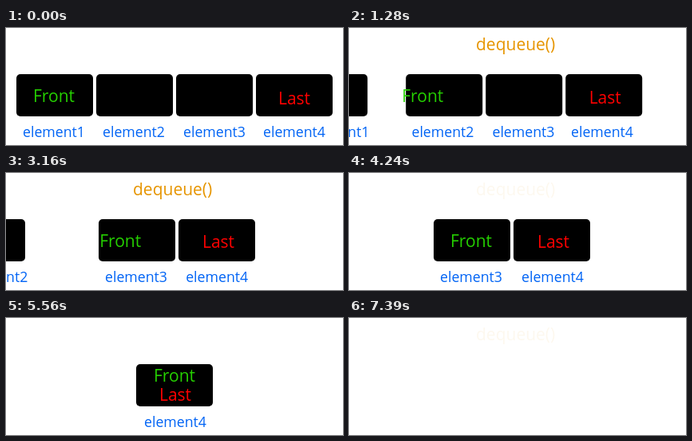
An HTML page with a canvas for the animation above (7420 ms loop, 422 px wide and 147 px high).

```html
<!DOCTYPE html>
<html lang="en">
<head>
<meta charset="utf-8">
<title>Queue dequeue</title>
<style>
html, body { margin: 0; width: 100%; height: 100%; overflow: hidden; background: #fff; }
canvas { display: block; }
</style>
</head>
<body>
<canvas id="stage" width="422" height="147"></canvas>
<script>
const ctx = document.getElementById('stage').getContext('2d');
const LOOP = 7420, STEP = 30, STEPS = 15;

// Resting layouts, before the first and after each dequeue; front and last are [x, baseline].
const poses = [
  { boxes: [13, 113, 213, 313], labels: [21, 121, 222, 322], front: [34, 93], last: [341, 96] },
  { boxes: [-104, 56, 156, 256], labels: [-79, 63, 164, 262], front: [78, 93], last: [286, 94] },
  { boxes: [-104, -104, 106, 206], labels: [-79, -79, 114, 216], front: [127, 93], last: [236, 94] },
  { boxes: [-104, -104, -104, 163], labels: [-79, -79, -79, 173], front: [185, 80], last: [192, 104] },
  { boxes: [-104, -104, -104, -182], labels: [-79, -79, -79, -162], front: [-135, 80], last: [-128, 104] }
];

// Start times of each round: caption fades in, queue moves, caption fades out.
const rounds = [
  [30, 980, 1430],
  [2380, 2830, 3280],
  [4240, 4690, 5140],
  [6130, 6580, 7000]
];

function progress(t, start) {
  const step = Math.floor((t - start) / STEP) + 1;
  return Math.min(Math.max(step / STEPS, 0), 1);
}

const mix = (a, b, p) => a.map((v, i) => v + (b[i] - v) * p);

function text(str, x, y, size, color) {
  ctx.font = `${size}px "Open Sans", sans-serif`;
  ctx.fillStyle = color;
  ctx.fillText(str, x, y);
}

function draw(t) {
  const n = Math.max(0, rounds.findLastIndex(r => t >= r[0]));
  const [fadeIn, move, fadeOut] = rounds[n];
  const p = progress(t, move);
  const at = key => mix(poses[n][key], poses[n + 1][key], p);

  ctx.fillStyle = '#fff';
  ctx.fillRect(0, 0, 422, 147);

  ctx.fillStyle = '#000';
  for (const x of at('boxes')) {
    ctx.beginPath();
    ctx.roundRect(x, 58, 96, 53, 5);
    ctx.fill();
  }
  at('labels').forEach((x, i) => text('element' + (i + 1), x, 137, 17.7, '#0064f5'));
  text('Front', ...at('front'), 21, '#25d000');
  text('Last', ...at('last'), 21, '#ff0000');

  ctx.globalAlpha = progress(t, fadeIn) * (1 - progress(t, fadeOut));
  text('dequeue()', 159, 28, 21, '#e69500');
  ctx.globalAlpha = 1;
}

function tick() {
  draw(performance.now() % LOOP);
  requestAnimationFrame(tick);
}
tick();
</script>
</body>
</html>
```
